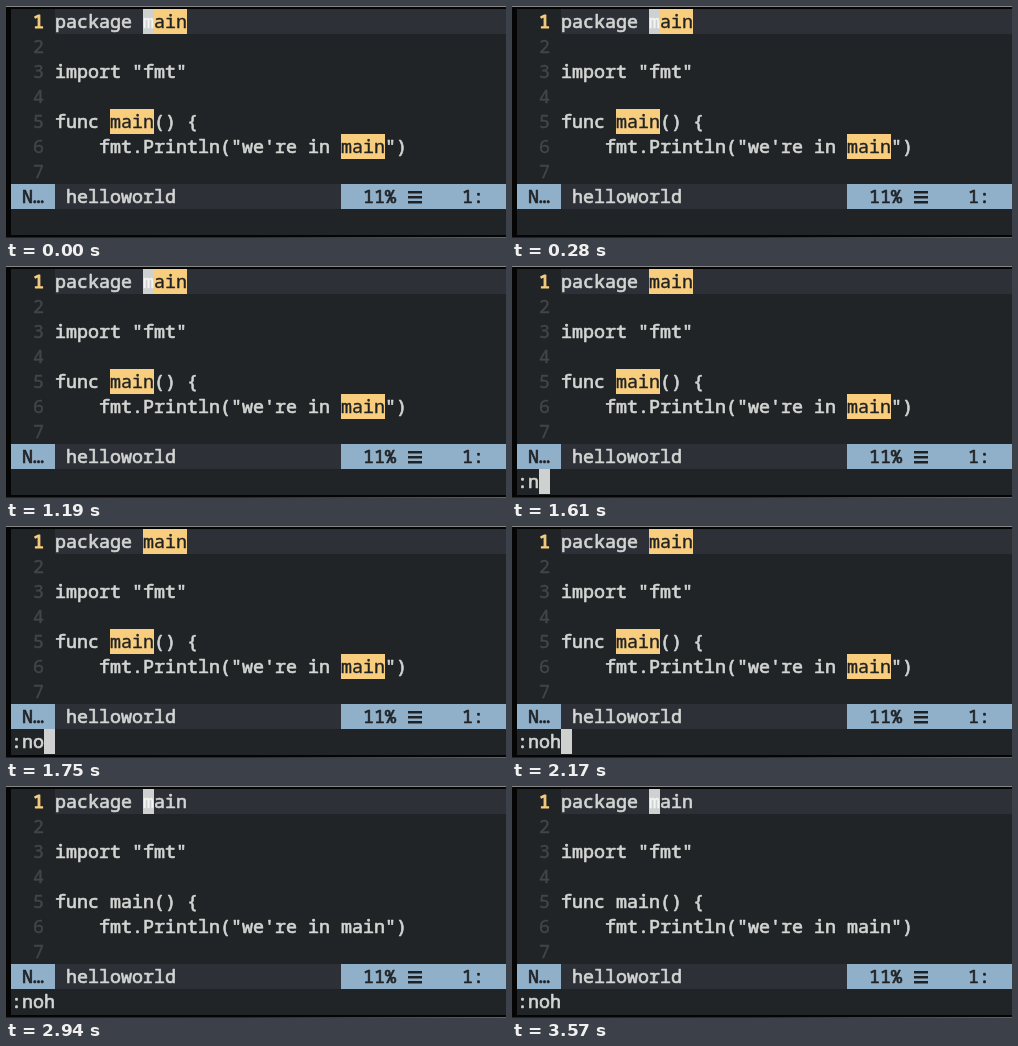
These frames come from a looping animation (500 px wide and 232 px high, 3640 ms). An HTML page with a canvas:

```html
<!DOCTYPE html>
<html lang="en">
<head>
<meta charset="utf-8">
<title>Clearing search highlights</title>
<style>
html, body { margin: 0; width: 100%; height: 100%; overflow: hidden; background: #000; }
canvas { display: block; }
</style>
</head>
<body>
<canvas id="screen" width="500" height="232"></canvas>
<script>
const ctx = document.getElementById('screen').getContext('2d');
const LOOP = 3640;
const CELL = 11, LEFT = 5, TOP = 3, PITCH = 25;
const BLINK_OFF = 420, BLINK_ON = 980, COMMAND = 1470, CLEARED = 2450;
const KEYS = [[COMMAND, ':'], [1540, 'n'], [1680, 'o'], [1820, 'h']];
const FONT = '18.33px "Noto Sans Mono", "DejaVu Sans Mono", monospace';
const color = {
  bg: '#212426', line: '#2d3036', text: '#d3d5d3', gutter: '#424549',
  yellow: '#f8ce7e', blue: '#90afc9', dark: '#202326', cursor: '#cfd1d1'
};
const code = [
  'package main', '', 'import "fmt"', '',
  'func main() {', '    fmt.Println("we\'re in main")', ''
];

const colX = col => LEFT + col * CELL;
const rowY = row => TOP + row * PITCH;

function rect(x, y, w, h, fill) {
  ctx.fillStyle = fill;
  ctx.fillRect(x, y, w, h);
}

function cells(col, row, count, fill) {
  rect(colX(col), rowY(row), count * CELL, PITCH, fill);
}

// A thin outline gives the regular weight a medium look.
function write(str, col, row, fill, outline = 0.7) {
  const x = colX(col), y = rowY(row) + 19;
  ctx.font = FONT;
  ctx.fillStyle = ctx.strokeStyle = fill;
  ctx.lineWidth = outline;
  ctx.lineJoin = 'round';
  ctx.fillText(str, x, y);
  ctx.strokeText(str, x, y);
}

function drawWindow() {
  rect(0, 0, 500, 232, '#050505');
  rect(0, 0, 500, 1, '#858585');
  rect(LEFT, TOP, 495, 226, color.bg);
  const edge = ctx.createLinearGradient(0, 0, 500, 0);
  edge.addColorStop(0, '#20260f');
  edge.addColorStop(0.5, '#2b2c22');
  edge.addColorStop(1, '#62625e');
  rect(0, 231, 500, 1, edge);
}

function drawCode(highlighted) {
  cells(4, 0, 41, color.line);
  code.forEach((str, row) => {
    const current = row === 0;
    write(String(row + 1), 2, row, current ? color.yellow : color.gutter, current ? 1.2 : 0.4);
    write(str, 4, row, color.text);
    const at = str.indexOf('main');
    if (highlighted && at >= 0) {
      cells(4 + at, row, 4, color.yellow);
      write('main', 4 + at, row, color.dark, 0.4);
    }
  });
}

function drawStatus() {
  const row = 7;
  cells(0, row, 4, color.blue);
  cells(4, row, 26, color.line);
  cells(30, row, 15, color.blue);
  write('N…', 1, row, color.dark);
  write('helloworld', 5, row, color.text);
  write('11%', 32, row, color.dark);
  for (let i = 0; i < 3; i++) rect(402, 185 + i * 5, 14, 2.5, color.dark);
  write('1:', 41, row, color.dark);
}

function draw(t) {
  const typing = t >= COMMAND && t < CLEARED;
  const blinkedOff = t >= BLINK_OFF && t < BLINK_ON;
  const command = KEYS.filter(([time]) => t >= time).map(([, key]) => key).join('');

  drawWindow();
  drawCode(t < CLEARED);
  drawStatus();
  write(command, 0, 8, color.text);
  if (typing) {
    cells(command.length, 8, 1, color.cursor);
  } else if (!blinkedOff) {
    cells(12, 0, 1, color.cursor);
    write('m', 12, 0, '#f3f4f4', 0.4);
  }
}

function tick() {
  draw(performance.now() % LOOP);
  requestAnimationFrame(tick);
}
tick();
</script>
</body>
</html>
```
